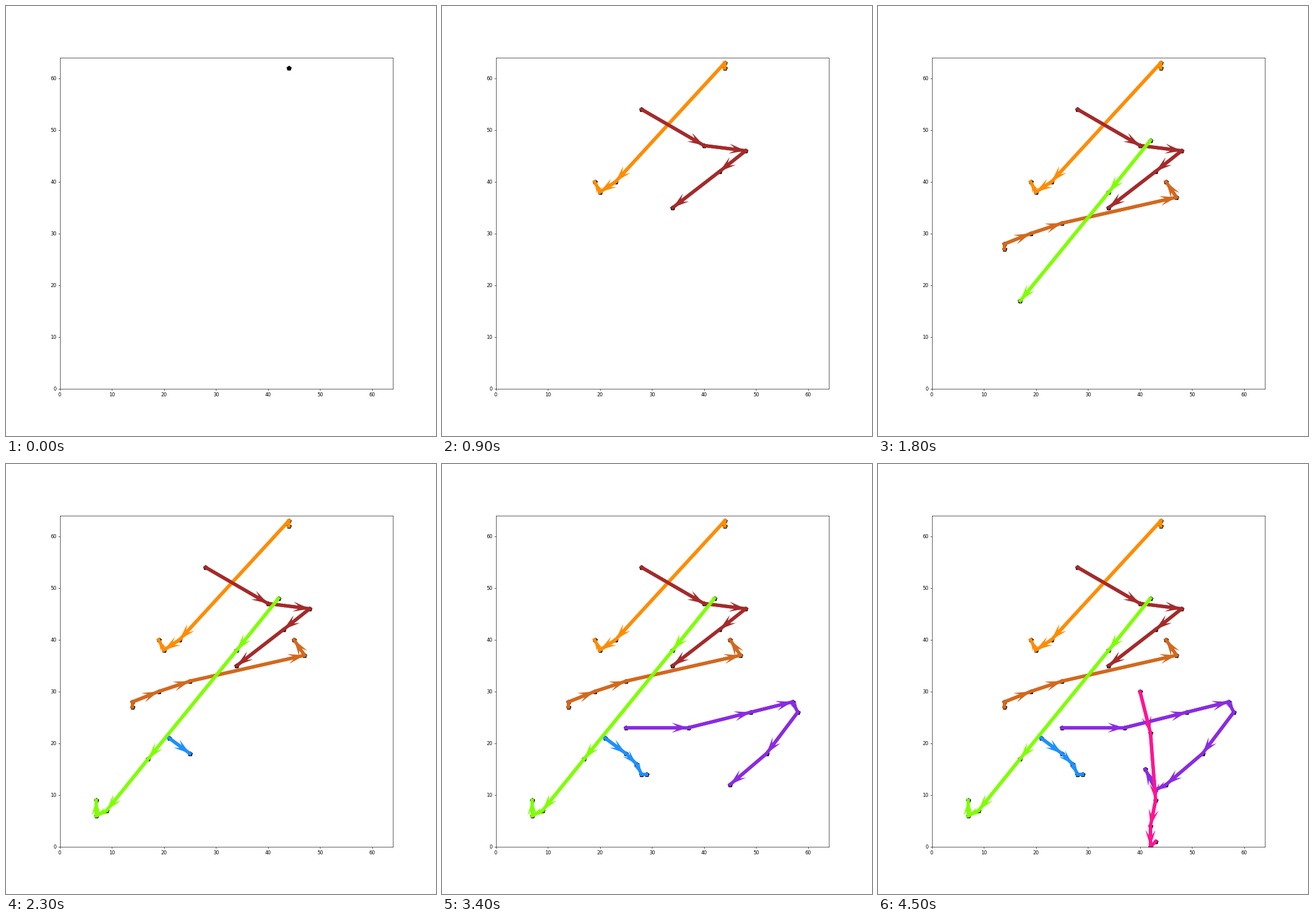
A matplotlib script that plays this animation: 748x748 px, repeating every 4600 ms.

```python
import math

import matplotlib.pyplot as plt
from matplotlib.animation import FuncAnimation

GRID = 64
FRAMES = 46
DPI = 60
STAGE = 748

# Turning points of each stroke; a third value is the number of eased steps
# taken to get there. Repeating a point makes the pen rest.
STROKES = {
    "darkorange": [(44, 62), (44, 63), (23, 40), (20, 38), (19, 40)],
    "brown": [(28, 54), (40, 47), (48, 46), (43, 42), (34, 35)],
    "chocolate": [(14, 27), (14, 28), (25, 32, 2), (47, 37), (45, 40)],
    "chartreuse": [(42, 48), (9, 7, 3), (7, 6), (7, 9)],
    "dodgerblue": [(21, 21), (25, 18), (27, 16), (28, 14), (29, 14, 2)],
    "blueviolet": [(25, 23), (37, 23), (49, 26), (57, 28), (58, 26), (52, 18),
                   (45, 12), (43, 11), (41, 15)],
    "deeppink": [(40, 30), (42, 22), (43, 9), (42, 0, 2), (43, 1)],
}


def snap(value):
    """Nearest grid line, halves going down."""
    return math.ceil(value - 0.5 - 1e-9)


def glide(start, end, steps):
    """Grid points on the way from start to end with a cosine ease."""
    for i in range(1, steps + 1):
        t = (1 - math.cos(math.pi * i / steps)) / 2
        yield tuple(snap(a + (b - a) * t) for a, b in zip(start, end))


def trace(keys):
    """All points the pen visits in one stroke."""
    points = [keys[0]]
    for x, y, *steps in keys[1:]:
        points += glide(points[-1], (x, y), *(steps or [1]))
    return points


fig, ax = plt.subplots(figsize=(STAGE / DPI, STAGE / DPI), dpi=DPI)


def add_stop(point):
    return [ax.scatter(*point, s=100, marker="p", color="black")]


def add_arrow(start, end, color):
    (x0, y0), (x1, y1) = start, end
    shaft = ax.plot([x0, x1], [y0, y1], color=color, lw=7)
    head = ax.quiver([x0], [y0], [x1 - x0], [y1 - y0], color=color,
                     angles="xy", scale_units="xy", scale=1,
                     width=0.01, headaxislength=3.5)
    return shaft + [head]


beats = []
for color, keys in STROKES.items():
    points = trace(keys)
    for prev, point in zip([None] + points, points):
        parts = add_stop(point)
        if prev and prev != point:
            parts += add_arrow(prev, point, color)
        beats.append(parts)

ax.set_xlim(0, GRID)
ax.set_ylim(0, GRID)


def update(frame):
    for i, parts in enumerate(beats):
        for part in parts:
            part.set_visible(i <= frame)
    return [part for parts in beats for part in parts]


anim = FuncAnimation(fig, update, frames=FRAMES, interval=1000 / 10,
                     repeat=True, repeat_delay=0, blit=False)
plt.show()
```
